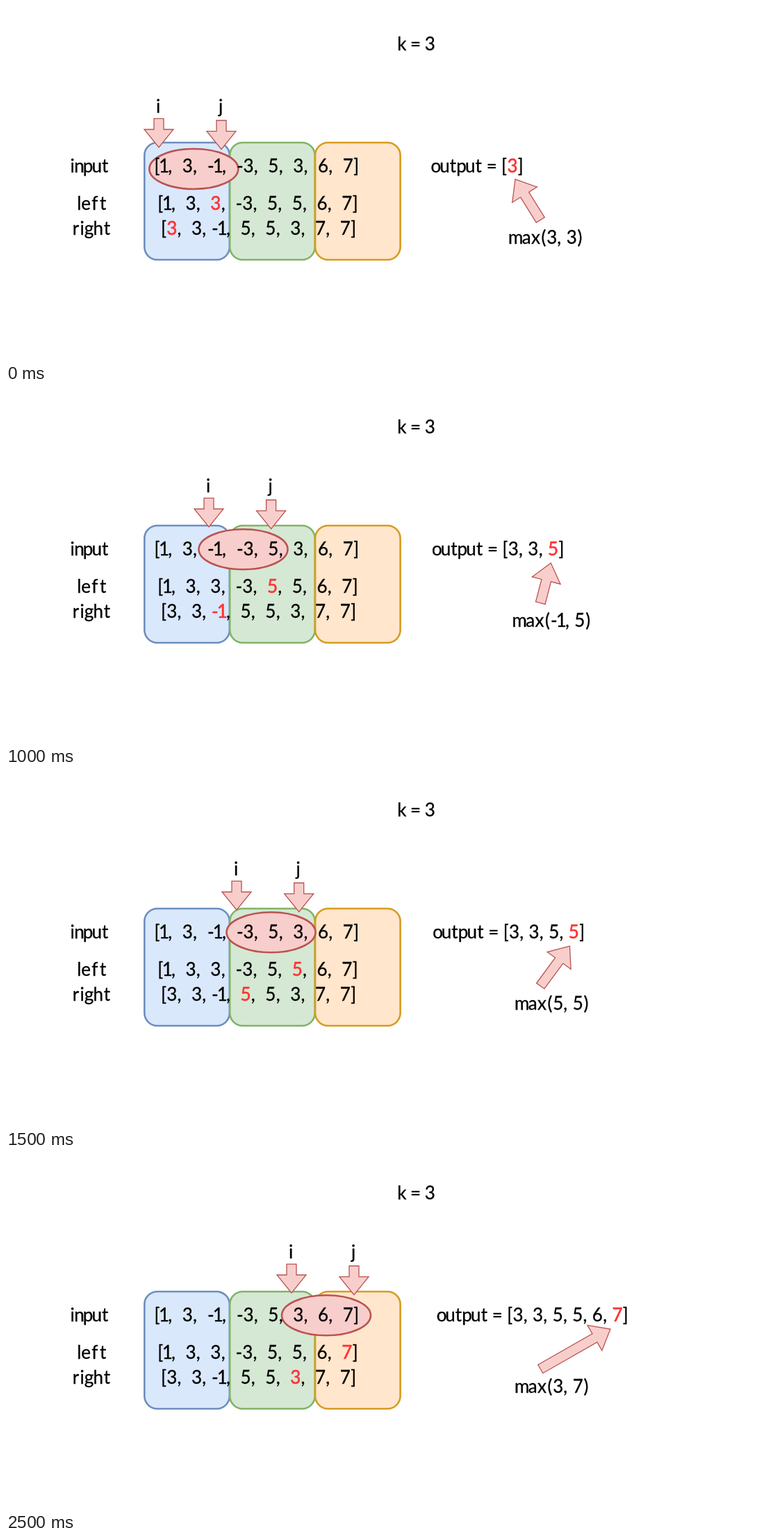
Animation, 1094 px wide and 512 px high, one loop 3 s. Source, as an HTML page:

```html
<!DOCTYPE html>
<html lang="en">
<head>
<meta charset="utf-8">
<title>Sliding window maximum</title>
<style>
  html, body { margin: 0; width: 100%; height: 100%; overflow: hidden; background: #fff; }
  svg { display: block; width: 100%; height: 100%; }
  text {
    font: 26px Lato, sans-serif;
    font-kerning: none;
    font-variant-ligatures: none;
    text-anchor: middle;
    white-space: pre;
    stroke: #000;
    stroke-width: .3;
    stroke-linejoin: round;
  }
  .hot { fill: #f33; stroke: #f33; stroke-width: .6; }
  .pink { fill: #f8cecc; stroke: #b85450; }
</style>
</head>
<body>
<svg id="stage" viewBox="0 0 1094 512"></svg>
<script>
const STEP = 500;
const EM = 24.1;

// Advance of each character, in em.
const ADVANCE = {
  a: .512, e: .548, f: .508, g: .53, h: .577, i: .28, k: .539, l: .274, m: .776,
  n: .523, o: .527, p: .534, r: .48, t: .471, u: .52, x: .59, j: .402,
  " ": .299, ",": .277, "-": .416, "=": .51, "[": .376, "]": .376, "(": .367, ")": .367, 1: .45
};
const DIGIT = .61;

const INPUT = "[1,  3,  -1,  -3,  5,  3,  6,  7]";
const LEFT = "[1,  3,  3,  -3,  5,  5,  6,  7]";
const RIGHT = "[3,  3, -1,  5,  5,  3,  7,  7]";
const numbers = row => row.match(/-?\d/g).map(Number);
const left = numbers(LEFT);
const right = numbers(RIGHT);

// One row per step: i arrow, j arrow, ellipse centre, output text, max text, arrow tip.
const STEPS = [
  { i: 220, j: 310, oval: 270.3, out: 612.5, max: 724.2, tip: [733, 250] },
  { i: 258.3, j: 348.2, oval: 308, out: 615.5, max: 726.7, tip: [760.5, 251.5] },
  { i: 292, j: 381.6, oval: 341.5, out: 613.9, max: 729.7, tip: [784.3, 251] },
  { i: 332, j: 421.7, oval: 381.5, out: 615.1, max: 733.2, tip: [811.5, 251] },
  { i: 368.4, j: 458, oval: 418.3, out: 614.4, max: 733.2, tip: [832, 251] },
  { i: 411, j: 501, oval: 461, out: 620.6, max: 733.2, tip: [870, 251] }
];

const stage = document.getElementById("stage");

function add(tag, attrs) {
  const el = document.createElementNS("http://www.w3.org/2000/svg", tag);
  set(el, attrs);
  return stage.appendChild(el);
}

function set(el, attrs) {
  for (const key in attrs) el.setAttribute(key, attrs[key]);
}

// Places every character on the centre of its advance; colours the n-th number.
function write(el, str, x, y, n = -1) {
  const xs = [...str].map(ch => {
    const w = (ADVANCE[ch] || DIGIT) * EM;
    x += w;
    return (x - w / 2).toFixed(1);
  });
  set(el, { x: xs.join(" "), y });
  let count = 0;
  el.innerHTML = str.replace(/-?\d/g, num =>
    count++ === n ? `<tspan class="hot">${num}</tspan>` : num);
}

function label(str, x, y) {
  write(add("text", {}), str, x, y);
}

// Block arrow from the middle of its tail to its tip.
function arrow(x0, y0, x1, y1) {
  const len = Math.hypot(x1 - x0, y1 - y0);
  const ux = (x1 - x0) / len, uy = (y1 - y0) / len;
  const neck = len - 26;
  const outline = [[0, -7], [neck, -7], [neck, -21], [len, 0], [neck, 21], [neck, 7], [0, 7]];
  return outline.map(([a, b]) =>
    (x0 + a * ux - b * uy).toFixed(1) + "," + (y0 + a * uy + b * ux).toFixed(1)).join(" ");
}

[
  ["#dae8fc", "#6c8ebf"],
  ["#d5e8d4", "#82b366"],
  ["#ffe6cc", "#d79b20"]
].forEach(([fill, stroke], k) => add("rect", {
  x: 199.3 + k * 122.9, y: 197, width: 122.5, height: 169, rx: 18.5,
  fill, stroke, "stroke-width": 2.6
}));

const oval = add("ellipse", { class: "pink", rx: 64, ry: 29, "stroke-width": 2.6 });
const [iArrow, jArrow, pointer] = [0, 1, 2].map(() =>
  add("polygon", { class: "pink", "stroke-width": 1.3 }));

label("k = 3", 563.3, 64.3);
label("input", 92.3, 240.3);
label("left", 102, 293.6);
label("right", 94.8, 330.3);
label(INPUT, 213, 240.3);

const [leftText, rightText, outText, maxText, iText, jText] =
  Array.from({ length: 6 }, () => add("text", {}));

function draw(n) {
  const s = STEPS[n];
  const drop = n ? 0 : 5;
  const output = STEPS.slice(0, n + 1).map((_, k) => Math.max(right[k], left[k + 2]));

  set(oval, { cx: s.oval, cy: n ? 231.3 : 235 });
  set(iArrow, { points: arrow(s.i, 157.3 + drop, s.i, 199 + drop) });
  set(jArrow, { points: arrow(s.j, 160 + drop, s.j, 201.7 + drop) });
  set(pointer, { points: arrow(769.3, 308.6, ...s.tip) });

  write(leftText, LEFT, 217.8, 293.6, n + 2);
  write(rightText, RIGHT, 222.4, 330.3, n);
  write(outText, `output = [${output.join(", ")}]`, s.out, 240.3, n);
  write(maxText, `max(${right[n]}, ${left[n + 2]})`, s.max, 343.4);
  write(iText, "i", s.i - 4.4, 148.8 + drop);
  write(jText, "j", s.j - 5.8, 148.8 + drop);
}

const start = performance.now();
let shown = -1;

function tick() {
  const n = Math.floor((performance.now() - start) / STEP) % STEPS.length;
  if (n !== shown) draw(shown = n);
  requestAnimationFrame(tick);
}
tick();
</script>
</body>
</html>
```
